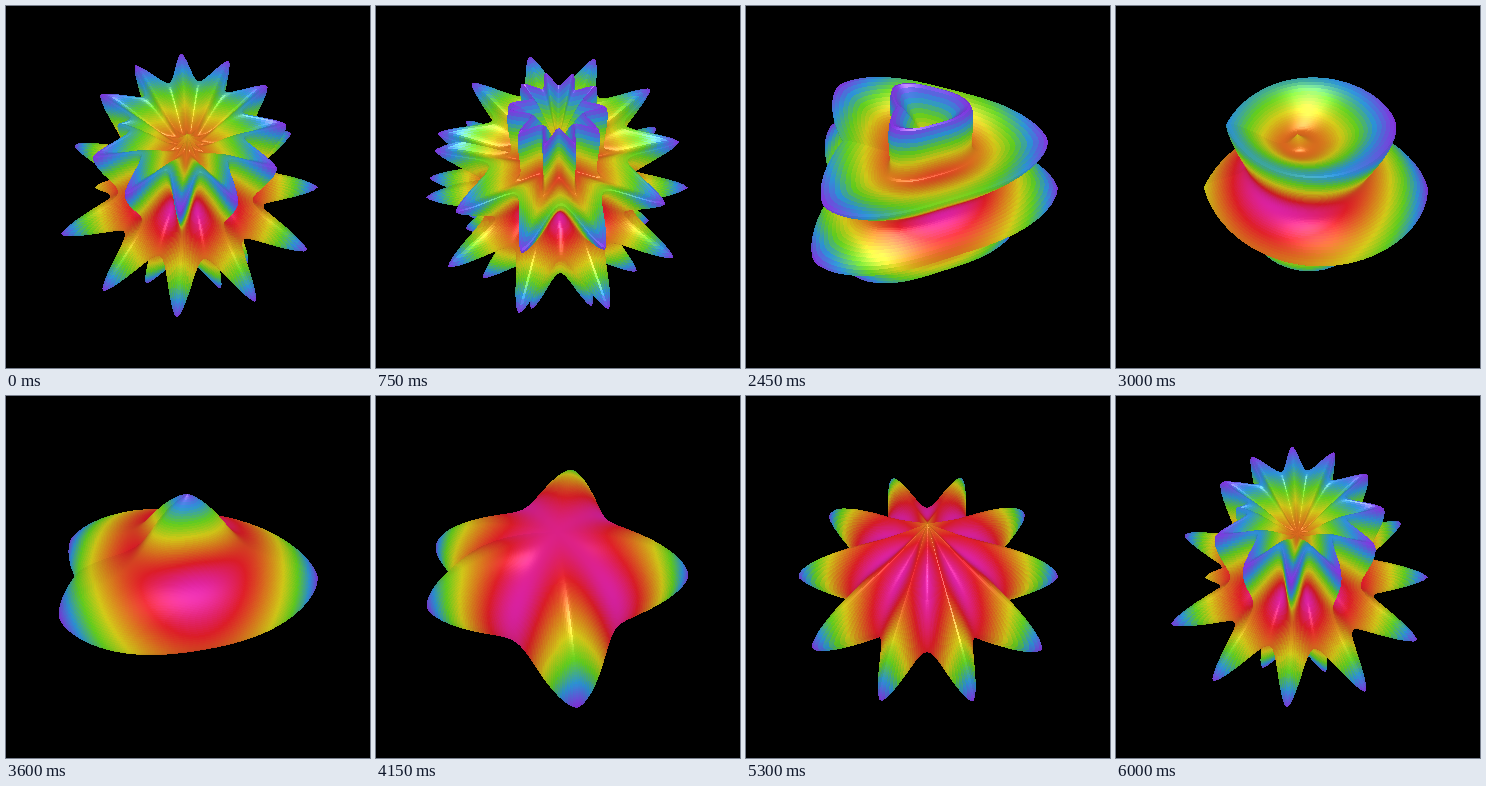
These frames come from a looping animation (364x362 px, 6.05 s). An HTML page with a canvas:

```html
<!DOCTYPE html>
<html>
<head>
<meta charset="utf-8">
<title>Morphing supershape</title>
<style>
html, body { margin: 0; width: 100%; height: 100%; overflow: hidden; background: #000; }
canvas { display: block; }
</style>
</head>
<body>
<canvas id="stage" width="364" height="362"></canvas>
<script>
const W = 364, H = 362, CX = 181, CY = 181, R = 130;
const STEP = 50, FRAMES = 121, LAG = 1.4;
const LON = 360, LAT = 180, ROW = LON + 1, COUNT = ROW * (LAT + 1);
const SIN = Math.sqrt(3) / 2, COS = 0.5;   // camera raised by 60 degrees
const PERSP = 0.28;                        // radius / camera distance
const EYE_Y = COS / PERSP, EYE_Z = SIN / PERSP;

// even colour stops from the nearest to the farthest point of the surface
const STOPS = [
  [225, 35, 165], [225, 30, 40], [220, 120, 30], [215, 205, 25],
  [100, 210, 30], [45, 150, 220], [140, 50, 230]
];

const ctx = document.getElementById('stage').getContext('2d');
const image = ctx.createImageData(W, H);
const pixels = new Uint32Array(image.data.buffer);
const depth = new Float32Array(W * H);
const array = () => new Float32Array(COUNT);
const px = array(), py = array(), pz = array(), sx = array(), sy = array(), near = array();
let minDist, maxDist;

// superformula with n1 = 0.2, n2 = n3 = 1.7
function radius(angle, m) {
  const a = m * angle / 4;
  return Math.pow(Math.abs(Math.cos(a)) ** 1.7 + Math.abs(Math.sin(a)) ** 1.7, -5);
}

function buildMesh(mLon, mLat) {
  const ring = Array.from({ length: ROW }, (_, j) => {
    const lon = (j / LON * 2 - 1) * Math.PI, r = radius(lon, mLon);
    return [r * Math.cos(lon), r * Math.sin(lon)];
  });
  minDist = Infinity;
  maxDist = 0;
  for (let i = 0, n = 0; i <= LAT; i++) {
    const lat = (i / LAT - 0.5) * Math.PI, r = radius(lat, mLat);
    const flat = r * Math.cos(lat), z = r * Math.sin(lat);
    for (let j = 0; j < ROW; j++, n++) {
      const x = flat * ring[j][0], y = flat * ring[j][1];
      const k = 1 / (1 - PERSP * (SIN * z + COS * y));
      const dist = Math.sqrt(x * x + y * y + z * z);
      minDist = Math.min(minDist, dist);
      maxDist = Math.max(maxDist, dist);
      px[n] = x; py[n] = y; pz[n] = z;
      sx[n] = CX + R * k * x;
      sy[n] = CY + R * k * (SIN * y - COS * z);
      near[n] = k;
    }
  }
}

// colour follows the distance from the centre, lit from the camera
function shade(a, b, c, d) {
  const x = (px[a] + px[d]) / 2, y = (py[a] + py[d]) / 2, z = (pz[a] + pz[d]) / 2;
  const ux = px[d] - px[a], uy = py[d] - py[a], uz = pz[d] - pz[a];
  const vx = px[c] - px[b], vy = py[c] - py[b], vz = pz[c] - pz[b];
  const nx = uy * vz - uz * vy, ny = uz * vx - ux * vz, nz = ux * vy - uy * vx;
  const ey = EYE_Y - y, ez = EYE_Z - z;
  const facing = Math.abs(ny * ey + nz * ez - nx * x) /
    (Math.sqrt((nx * nx + ny * ny + nz * nz) * (x * x + ey * ey + ez * ez)) + 1e-12);
  const light = 0.85 + 0.15 * facing, shine = 80 * facing ** 45;

  const t = (Math.sqrt(x * x + y * y + z * z) - minDist) / (maxDist - minDist);
  const pos = Math.max(0, Math.min(1, t)) * (STOPS.length - 1);
  const i = Math.min(STOPS.length - 2, Math.floor(pos));
  const lo = STOPS[i], hi = STOPS[i + 1];
  const channel = n => Math.min(255, (lo[n] + (hi[n] - lo[n]) * (pos - i)) * light + shine);
  return (255 << 24 | channel(2) << 16 | channel(1) << 8 | channel(0)) >>> 0;
}

function triangle(a, b, c, color) {
  const ax = sx[a], ay = sy[a], bx = sx[b], by = sy[b], cx = sx[c], cy = sy[c];
  const area = (bx - ax) * (cy - ay) - (by - ay) * (cx - ax);
  if (!area) return;
  const x0 = Math.ceil(Math.min(ax, bx, cx)), x1 = Math.floor(Math.max(ax, bx, cx));
  const y0 = Math.ceil(Math.min(ay, by, cy)), y1 = Math.floor(Math.max(ay, by, cy));
  for (let y = y0; y <= y1; y++) {
    for (let x = x0; x <= x1; x++) {
      const u = ((x - ax) * (cy - ay) - (y - ay) * (cx - ax)) / area;
      const v = ((bx - ax) * (y - ay) - (by - ay) * (x - ax)) / area;
      if (u < -1e-4 || v < -1e-4 || u + v > 1.0001) continue;
      const k = near[a] + u * (near[b] - near[a]) + v * (near[c] - near[a]);
      const p = y * W + x;
      if (k > depth[p]) {
        depth[p] = k;
        pixels[p] = color;
      }
    }
  }
}

function draw(frame) {
  const phase = Math.abs(frame - LAG) * 2 * Math.PI / (FRAMES - 1);
  buildMesh(6.5 + 5 * Math.cos(phase), 6.5 + 5 * Math.sin(phase));
  depth.fill(0);
  pixels.fill(0xff000000);
  for (let i = 0; i < LAT; i++) {
    for (let j = 0; j < LON; j++) {
      const a = i * ROW + j, b = a + 1, c = a + ROW, d = c + 1;
      const color = shade(a, b, c, d);
      triangle(a, b, c, color);
      triangle(b, d, c, color);
    }
  }
  ctx.putImageData(image, 0, 0);
}

let shown = -1;
const start = performance.now();
function tick() {
  const frame = Math.floor((performance.now() - start) / STEP) % FRAMES;
  if (frame !== shown) draw(shown = frame);
  requestAnimationFrame(tick);
}
tick();
</script>
</body>
</html>
```
